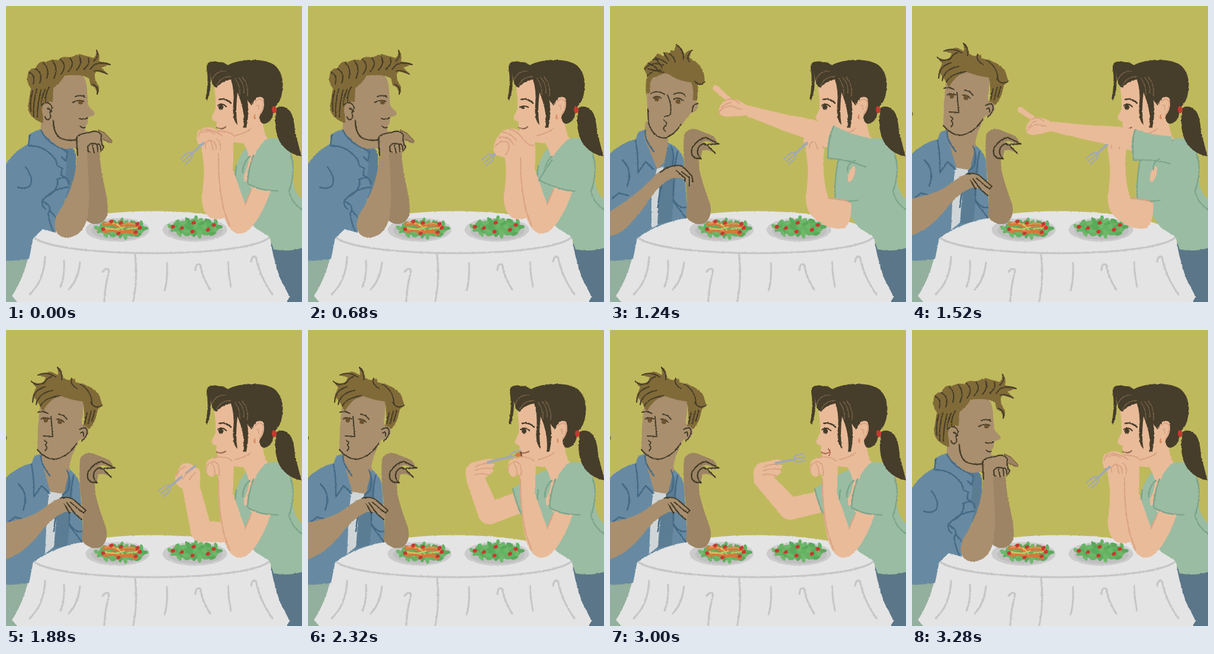
Write an HTML page that moves like this. It is 500 by 500 pixels and loops after 3.64 s.

```html
<!DOCTYPE html>
<html lang="en">
<head>
<meta charset="utf-8">
<title>Dinner for two</title>
<style>
html, body { margin: 0; width: 100%; height: 100%; overflow: hidden; background: #bfb95d; }
svg { display: block; width: 100vw; height: 100vh; }
.line { fill: none; stroke-linecap: round; stroke-linejoin: round; }
.pose { display: none; }
.pose.on { display: inline; }
</style>
</head>
<body>
<svg id="stage" viewBox="0 0 500 500"></svg>
<script>
const LOOP = 3640;
const C = {
  cloth: '#e4e4e4', fold: '#c6c6c6', plate: '#cccbcc',
  tan: '#a98f6e', tanShade: '#9c8464', ink: '#443c29', brown: '#806a38',
  denim: '#678aa2', denimDark: '#5b7d94', denimLine: '#456a86', tee: '#d0d6d8',
  peach: '#e9bb99', peachLine: '#d9a182', dark: '#463d2b',
  mint: '#9abca2', mintLine: '#7ba48a', steel: '#a2a8b2', red: '#c7392f'
};
const fill = (color, d) => `<path fill="${color}" d="${d}"/>`;
const line = (color, width, d) => `<path class="line" stroke="${color}" stroke-width="${width}" d="${d}"/>`;
const oval = (color, x, y, rx, ry, turn = 0) =>
  `<ellipse fill="${color}" rx="${rx}" ry="${ry}" transform="translate(${x} ${y}) rotate(${turn})"/>`;
const move = (transform, art) => `<g transform="${transform}">${art}</g>`;

// Tapered limb through joints given as [x, y, width]
function limb(color, ...joints) {
  let art = joints.map(([x, y, w]) => oval(color, x, y, w / 2, w / 2)).join('');
  for (let i = 1; i < joints.length; i++) {
    const [ax, ay, aw] = joints[i - 1], [bx, by, bw] = joints[i];
    const len = 2 * Math.hypot(bx - ax, by - ay);
    const nx = (ay - by) / len, ny = (bx - ax) / len;
    art += fill(color, `M${ax + nx * aw} ${ay + ny * aw}L${bx + nx * bw} ${by + ny * bw}` +
      `L${bx - nx * bw} ${by - ny * bw}L${ax - nx * aw} ${ay - ny * aw}Z`);
  }
  return art;
}

/* ---------- table ---------- */
function salad(cx, cy, rx, ry) {
  const greens = ['#66b263', '#5aa95a', '#6fb86a'];
  let art = oval(greens[0], cx, cy, rx - 2, ry - 2);
  for (let i = 0; i < 40; i++) {
    const a = i * 2.4, r = Math.sqrt((i + 1) / 40);
    art += oval(greens[i % 3], cx + rx * r * Math.cos(a), cy + ry * r * Math.sin(a), 6, 3.2, i * 53);
  }
  return art;
}
const tomatoes = spots => spots.map(([x, y]) => oval(C.red, x, y, 3.6, 3, -20)).join('');

const table =
  fill('#93af9d', 'M-9 428L42 424L20 505H-9Z') +
  fill('#5b7688', 'M442 400L510 405V510H460Z') +
  fill(C.cloth, 'M44 392C58 365 150 347 245 346.5C340 346 430 362 446 389Q449 420 463 460L479 491L469 510H22L19 500L10 490Q36 450 44 392Z') +
  line(C.fold, 3.4, 'M46 390C80 425 400 428 445 391') +
  line(C.fold, 3.2, 'M66 424Q64 465 40 487M98 430Q100 455 92 474M125 433Q122 462 106 479M163 449Q170 440 174 447Q167 475 166 499M218 419Q223 460 215 499M272 434Q273 465 268 480M320 446Q321 433 328 437Q332 460 345 479M375 432Q376 455 380 474M414 432Q416 420 422 424Q430 460 450 487') +
  oval(C.plate, 188.5, 378, 54, 20) + oval('#c0bfc0', 190, 379, 46, 16) +
  salad(195, 376.5, 42, 14) +
  line('#d27a3c', 7, 'M166 369Q178 366 192 372M197 371Q210 367 221 371M168 380Q181 376 193 382M197 381Q208 378 219 384') +
  line('#e5a35f', 1.6, 'M167 367Q180 364 190 371M198 369Q208 366 220 369M170 378Q182 375 192 380') +
  line('#cbd76c', 1.7, 'M165 375L187 377L200 373M188 368L198 379M205 377L225 374') +
  tomatoes([[178, 364], [194, 366], [164, 377], [190, 384], [222, 368], [226, 375], [219, 382]]) +
  oval(C.plate, 319, 378, 54.5, 20) + oval('#c0bfc0', 320, 380, 46, 15) +
  salad(320, 374, 43, 15) +
  tomatoes([[282, 373], [297, 375], [317, 366], [315, 381], [341, 378], [351, 370]]);

/* ---------- man ---------- */
const sideHead =
  fill(C.tan, 'M88 120L126 115Q137 122 137 145L139 168L150 181Q150 186 138 188L138 198Q133 203 134 212L122 228L118 240L92 242L58 212L62 165Z') +
  fill(C.brown, 'M63 198Q38 190 37 170L42 139Q32 128 38 111Q43 104 50 105Q54 92 68 94Q80 88 88 92Q94 83 108 87L124 81L148 88Q154 82 152 73Q160 80 157 93L176 99L161 104L173 116L152 110Q146 120 157 136Q158 147 153 150Q154 138 143 134L140 122Q128 114 99 118Q90 132 80 139L79 162Q64 160 62 172Z') +
  line(C.ink, 2, 'M45 143Q40 160 42 178M52 140Q45 165 47 187M59 142Q53 165 53 188M66 141Q59 157 60 168M73 137Q66 148 67 162M39 112Q50 116 46 132M50 106Q63 114 57 130M63 96Q74 106 69 122M78 93Q89 104 81 122M92 90Q104 101 93 115M108 88Q117 98 105 111M124 86Q130 96 119 108M139 88Q143 98 131 107M176 99Q154 90 142 107M153 75Q158 86 148 93M154 149Q158 138 146 132M171 115Q158 107 149 110') +
  oval(C.tan, 70, 178, 9, 15, -8) +
  line(C.ink, 2, 'M62 166Q72 159 78 171L76 179M70 173Q77 174 74 182Q78 188 72 192Q67 193 66 187') +
  line(C.ink, 2.4, 'M80 193Q80 216 92 223Q106 229 118 226') +
  line(C.ink, 2, 'M117 153Q128 149 133 154M113 163Q122 157 132 161M124 190Q132 193 138 189M125 203Q129 207 134 205') +
  oval('#6d522e', 126, 163, 4, 3.5);

const frontHead =
  fill(C.tan, 'M62 145L64 196Q68 218 90 223Q107 220 122 199L137 181Q150 178 149 163L141 158L146 125L75 108Z') +
  fill(C.brown, 'M61 149Q59 130 63 118L57 106Q61 96 72 91L80 80L91 85L91 78L102 80Q100 72 108 76L112 64Q124 72 126 83Q130 74 140 74Q133 83 136 89Q160 100 160 129L155 134L149 131L147 160L140 159Q142 140 137 129Q118 127 105 119Q97 113 90 114Q80 120 72 121Q66 129 68 146Z') +
  line(C.ink, 2, 'M58 107Q70 92 91 100M63 118Q75 106 87 108M72 91Q82 85 96 97M91 79L99 92M112 65Q125 74 124 91M100 80Q110 88 110 95M139 75Q127 84 134 94M66 97Q78 102 84 112M77 88L88 104M64 106Q80 110 91 112M160 128Q152 137 143 127') +
  line(C.ink, 2.2, 'M64 174L65 197Q72 222 92 223Q108 219 120 200') +
  line(C.ink, 2, 'M69 148Q79 141 92 149M108 149Q120 143 128 152M73 155Q80 150 87 156M108 157Q116 153 124 160M97 150Q105 166 102 184L92 187M91 193Q98 197 94 202Q87 207 94 212M148 165Q138 166 139 178') +
  oval('#6d522e', 79, 157, 4, 4) + oval('#6d522e', 115, 161, 4, 4);

const awayHead =
  fill(C.tan, 'M57 130L54 165L53 202Q60 217 85 219Q106 212 118 193L125 185Q140 182 139 167L128 158L133 112L75 106Z') +
  fill(C.brown, 'M62 138L54 122L45 111L51 97L42 86Q53 93 64 88L67 80L54 76L75 70L88 76L87 62Q97 69 96 80Q108 88 110 82L118 83L117 88Q148 94 158 111L163 128L155 134Q151 158 140 167L131 163Q134 137 130 121Q105 117 92 111Q75 115 62 138Z') +
  line(C.ink, 2, 'M43 87Q52 96 65 89Q70 80 77 79M54 76Q69 69 85 80M87 63Q96 72 94 84M45 122Q46 101 66 96M51 126Q55 106 79 102M58 128Q66 114 91 111M111 82Q107 91 120 99M126 92Q145 103 145 124M163 127Q150 135 143 122M137 140L133 158M144 137L139 158M150 136L145 154') +
  oval(C.tan, 131, 174, 8, 12, 20) +
  line(C.ink, 2, 'M124 168Q137 161 137 172Q136 181 128 187M126 174Q132 170 131 179') +
  line(C.ink, 2.2, 'M53 202Q68 220 85 218Q106 213 119 192') +
  line(C.ink, 2, 'M54 139Q62 136 71 141M89 142Q98 143 103 151M59 150Q66 147 74 150M85 151Q93 149 98 156M76 146L79 180L63 179M65 187Q72 190 66 194Q72 199 66 204') +
  oval('#6d522e', 67, 152, 4, 4) + oval('#6d522e', 91, 155, 4, 4);

const restingMan =
  fill(C.denimDark, 'M58 215L92 228Q110 228 118 250V320L90 330Z') +
  fill(C.denim, 'M-9 285Q4 250 39 232L40 216L57 208Q65 228 91 240L103 250L100 290L106 306L84 383L62 377L46 392L39 427Q20 431-9 430Z') +
  sideHead +
  line(C.denimLine, 2.5, 'M40 218L38 236Q66 235 84 260L87 270L95 274L93 285L101 291M59 210Q70 232 95 241L104 246L101 262L94 255M33 272Q47 290 41 303Q32 311 20 306M86 293Q106 285 106 300M87 293Q89 311 71 321M105 306Q76 309 61 330Q60 338 67 343M62 330Q80 338 71 350Q74 370 80 380M74 345L84 357') +
  fill(C.tanShade, 'M135 238L157 240C159 285 173 320 172 350C166 373 145 371 136 362Z') +
  fill(C.tanShade, 'M155 210L166 214L180 230Q171 233 162 224Z') +
  fill(C.tan, 'M118 235C124 280 107 320 88 350C77 370 82 389 100 391C121 392 133 378 138 355C143 318 138 282 137 248L153 248L165 240L162 218Q151 208 128 213Q118 215 118 235Z') +
  line(C.ink, 2.2, 'M121 252L119 224Q120 216 140 214Q154 207 161 218Q159 230 165 238L163 243M138 238Q142 229 154 234L155 246M146 235L149 248M138 238L139 246L142 247M155 233Q161 233 160 246') +
  line('#7f6846', 1.8, 'M156 210L166 214L179 228M161 224L178 231');

const raisedArm =
  fill(C.tanShade, 'M125 218Q131 204 149 209L175 220L184 234L163 228L155 230L138 239Q140 254 150 257L151 276Q156 300 169 334Q174 356 160 367Q142 373 128 356Q132 322 126 276Q123 245 125 218Z') +
  fill(C.tanShade, 'M139 244Q147 222 161 233L178 248L163 243L156 244L153 258L143 257Z') +
  line(C.ink, 2.3, 'M184 233L162 222Q149 224 139 239Q135 254 145 257L154 258Q145 250 149 240Q155 230 163 234L178 249M166 234Q174 233 183 233');

const shirtBack =
  fill(C.denim, 'M-9 258Q15 232 43 225L48 213L61 208L96 230Q118 238 124 258L126 278L131 358Q85 365 46 392L39 427Q20 431-9 430Z') +
  fill(C.denimDark, 'M97 236Q114 245 112 280L104 364L79 369L84 304Z');
// Neck and undershirt for each turn of the chest
const chests = {
  front: fill(C.tan, 'M60 195L104 205Q96 222 98 233L92 264L80 276L57 220Z') +
    fill(C.tee, 'M79 275L91 271L83 304L80 370L70 376L70 320Z'),
  side: fill(C.tan, 'M56 208L122 190Q106 220 107 238L97 280L75 274Z') +
    fill(C.tee, 'M73 273L98 277L86 302L81 366L66 378L69 310Z')
};
const shirtLines =
  line(C.denimLine, 2.5, 'M43 226Q48 250 47 282L60 263L74 276M60 210Q56 222 74 246M103 236Q110 250 105 270L97 277Q82 310 81 340M114 246Q106 288 107 330L128 358M21 260Q39 277 29 304M4 325L15 316L31 320M108 329Q118 343 128 340');

const forearm = {
  high: fill(C.tan, 'M-9 352Q44 322 80 282Q100 266 121 270L138 287L140 299L134 304L128 295L118 290L104 291Q85 300 70 322Q50 352 30 372Q15 389-9 389Z') +
    line(C.ink, 2.2, 'M97 273Q115 266 124 272L138 287L140 297M121 280L134 290L134 304M112 278L126 290L127 296M85 281L96 273'),
  low: fill(C.tan, 'M-9 326Q44 320 73 294Q93 279 109 283L134 303L132 310L128 320L118 309L102 307Q84 312 61 338Q30 381-9 390Z') +
    line(C.ink, 2.2, 'M92 284Q109 280 117 289L135 305L131 309M109 291L124 304L131 309M103 292L117 311L128 320M99 294L107 309')
};
const uprightMan = (head, chest, arm) => shirtBack + chests[chest] + shirtLines + raisedArm + head + forearm[arm];

const men = {
  rest: restingMan,
  stir: uprightMan(move('rotate(-4 90 220)', sideHead), 'front', 'high'),
  turn: uprightMan(frontHead, 'front', 'high'),
  away: uprightMan(awayHead, 'side', 'low') + line(C.ink, 1.5, 'M0 180v4')
};

/* ---------- woman ---------- */
const eyes = {
  open: oval(C.dark, 363, 171, 4, 4.6) + line(C.dark, 2.2, 'M358 168Q365 163 372 170'),
  shy: oval(C.dark, 363, 172, 3, 2) + line(C.dark, 2.2, 'M358 171Q365 167 372 171')
};
const mouths = {
  smirk: line('#8f6950', 2.2, 'M356 205Q365 210 371 204'),
  calm: line('#9b6956', 2.2, 'M356 206Q363 210 371 205'),
  chew: line('#a8614f', 2, 'M356 206Q361 211 368 207M368 201Q373 206 369 212'),
  chomp: line('#a8614f', 2, 'M356 204Q361 208 368 205M368 199Q375 206 370 214')
};
const womanHead = (eye, mouth) =>
  fill(C.dark, 'M457 172Q471 165 482 181Q487 192 488 211L499 254Q480 251 467 236Q454 220 455 190Z') +
  fill(C.peach, 'M350 118L354 158L354 174L347 189Q349 194 356 196L355 203L358 207L357 213Q362 224 376 229L400 232Q428 208 434 190L440 156L410 115Z') +
  fill(C.dark, 'M339 105Q338 92 354 94Q368 94 375 100C392 89 442 86 457 103Q470 118 467 142Q465 162 453 172Q452 196 436 199Q428 198 428 186Q440 172 434 155Q423 150 418 162L415 168Q404 158 404 143Q413 174 406 205L401 206Q405 179 391 146Q387 178 391 201L387 196Q382 185 384 165Q386 143 380 124Q363 127 356 138Q347 137 345 112Q348 138 340 160L337 157Q343 130 339 105Z') +
  line('#756044', 1.5, 'M348 126Q353 109 371 110M356 134Q363 119 380 119M387 122Q396 135 395 150M393 121Q403 131 402 147M399 120Q410 133 408 152') +
  line(C.peachLine, 1.8, 'M421 161Q431 153 435 163Q434 177 428 184M424 168Q429 166 427 175M387 219Q404 215 414 207') +
  line('#d98b5f', 2.5, 'M420 185V190') +
  oval(C.red, 453, 175, 4, 6) +
  line(C.dark, 2.6, 'M360 158Q371 155 380 164') +
  eyes[eye] + mouths[mouth];

const womanTorso =
  fill(C.mint, 'M436 225Q464 218 477 236Q485 254 484 282Q483 304 493 319L510 338V405Q482 417 452 411L445 390L420 374L386 326Q381 290 389 270Q396 246 412 234L430 240Z') +
  fill(C.peach, 'M396 205L433 192Q435 213 442 225Q419 251 408 294Q401 302 402 286Q412 263 410 254Q405 232 392 222Z') +
  line(C.mintLine, 2.3, 'M441 226Q418 252 408 297M412 254Q399 266 400 282M481 250Q490 279 478 313Q482 332 500 344M389 270Q385 300 390 314');

const chinHand =
  fill(C.peach, 'M337 232Q338 217 352 216Q373 209 385 224L384 250L360 256Q358 238 353 246Q340 253 337 232Z') +
  line(C.peachLine, 1.8, 'M338 238Q338 225 350 222Q362 224 360 246M348 225Q355 235 352 246M351 216Q370 211 382 221');
const bentArm = (slack = 0) =>
  fill(C.mint, `M440 225Q415 245 ${408 - slack} ${298 - slack / 3}Q430 313 459 312Q470 285 468 245Z`) +
  fill(C.peach, 'M409 302Q430 313 447 312Q436 346 418 370Q405 387 390 384Q372 378 366 345Q357 300 358 245L383 224Q385 260 383 275Q392 301 404 335L416 308Z') +
  (slack ? fill(C.mint, 'M410 262L390 294Q420 309 450 313L455 270Z') : '') +
  line(C.mintLine, 2.3, slack ? 'M412 260Q400 278 390 294Q420 310 450 313' : 'M418 252Q409 276 408 300Q430 313 459 312') +
  line(C.peachLine, 2, 'M359 250Q358 300 368 345L378 372M404 335L414 311');

function fork(x, y, turn, length, food = false) {
  const neck = length - 20;
  return move(`translate(${x} ${y}) rotate(${turn})`,
    line(C.steel, 4, `M0 0H${Math.max(neck, 2)}`) +
    line(C.steel, 2.3, `M${length} -6H${neck + 7}Q${neck + 1} -4 ${neck} 0Q${neck + 1} 4 ${neck + 7} 6H${length}M${neck} 0H${length}`) +
    (food ? oval('#d27a3c', length - 5, 0, 6, 3.5) + line('#6b4a30', 2, `M${length - 1} -4v8`) : ''));
}

const claspedHands =
  fill(C.peach, 'M322 226Q321 210 331 207Q346 202 357 210Q377 211 386 221L382 244L372 250L340 247Q325 238 322 226Z') +
  line(C.peachLine, 1.9, 'M325 220Q327 207 343 209Q358 213 365 219M332 214Q343 208 352 216M337 240Q335 228 345 227Q356 229 355 241M346 228L350 243M356 225Q364 229 362 243M357 211Q378 211 386 220');
const lowHands =
  fill(C.peach, 'M313 244Q314 224 329 211Q344 203 358 211L383 218L382 235Q372 241 366 255L340 258L318 252Z') +
  line(C.peachLine, 1.9, 'M316 238Q324 225 337 230Q343 239 334 251M328 213Q342 214 351 226M340 208Q354 211 361 222Q373 238 381 235M322 222Q340 219 347 234');
const uprightBackArm = fill(C.peach, 'M330 232L362 238Q361 310 374 356Q360 363 345 358Q329 346 331 318Q337 280 332 253Z');

const grip =
  fill(C.peach, 'M-25 14Q-29-13-10-18L14-18Q27-17 28-12L20-9L27-6L21 0L22 5L13 10Q2 11-6 26Z') +
  line(C.peachLine, 1.8, 'M-6-10Q8-13 20-9M-8-4Q6-6 21 0M-10 3Q3 2 13 10');
const backSleeve =
  fill(C.mint, 'M412 233Q372 248 346 268L360 311L392 292Z') +
  line(C.mintLine, 2.2, 'M346 268Q350 288 360 311');

// Back arm holding the fork: hand, turn, elbow, fork length, bite
function reach(hx, hy, turn, ex, ey, length, food) {
  const flip = Math.abs(turn) > 90 ? -1 : 1;
  const a = turn * Math.PI / 180, wx = -11, wy = 10 * flip;
  const wrist = [hx + wx * Math.cos(a) - wy * Math.sin(a), hy + wx * Math.sin(a) + wy * Math.cos(a), 31];
  return {
    back: limb(C.peach, wrist, [ex, ey, 37], [365, ey < 320 ? 288 : 334, 36]) + (ey < 320 ? backSleeve : '') +
      move(`translate(${hx} ${hy}) rotate(${turn}) scale(1 ${flip})`, grip),
    fork: fork(hx + 16 * Math.cos(a) + 12 * Math.sin(a) * flip, hy + 16 * Math.sin(a) - 12 * Math.cos(a) * flip, turn, length, food)
  };
}

const pointArm =
  fill(C.peach, 'M378 202Q340 190 300 184L230 167Q215 156 205 157L182 135Q173 131 174 141L196 160Q185 165 184 175Q183 186 198 187L229 185Q246 192 262 198Q300 214 338 226L372 242Z') +
  line(C.peachLine, 1.8, 'M184 179Q196 167 207 169Q214 174 222 174M196 159Q209 154 218 165M188 172Q196 164 204 163') +
  fill(C.mint, 'M442 224Q408 218 378 202Q363 226 368 258Q400 260 438 273Z') +
  line(C.mintLine, 2.3, 'M378 203Q368 224 368 257Q402 259 432 272M414 261Q400 266 401 279');
const pointBackArm =
  fill(C.peach, 'M330 232L362 238Q357 290 369 325L407 331Q410 360 397 375Q370 380 345 358Q329 346 331 318Q337 280 332 253Z') +
  line(C.peachLine, 1.8, 'M369 325Q389 325 406 332');
const pointHand =
  fill(C.peach, 'M326 228Q330 210 352 206L378 213L362 240L340 247Z') +
  line(C.peachLine, 1.8, 'M337 240Q336 230 346 228L351 242M354 225Q361 230 360 240');

function woman({ back = uprightBackArm, fork: tool = '', front = bentArm() + chinHand, eye = 'open', mouth = 'calm', dx = 0 }) {
  return back + womanTorso + move(`translate(${dx} 0)`, womanHead(eye, mouth)) + tool + front;
}
const pointing = (transform = '') => woman({
  back: '',
  front: fill(C.mint, 'M384 260L379 327Q396 333 420 329L430 260Z') + oval(C.peach, 408, 284, 5, 14, 18) +
    line(C.mintLine, 2.2, 'M385 262Q378 300 381 327Q396 332 420 328') +
    pointBackArm + pointHand + fork(333, 231, 138, 47) + move(transform, pointArm)
});
const aim = (turn, scale) => pointing(`translate(410 230) rotate(${turn}) scale(${scale}) translate(-410 -230)`);
const eating = (arm, mouth, dx = 1) => woman({ ...arm, mouth, dx });
const lowered = reach(267, 240, -12, 304, 302, 50);
const poised = {
  back: limb(C.peach, [312, 262, 29], [330, 340, 36], [372, 342, 34]) +
    fill(C.peach, 'M298 268Q284 262 286 248L294 230Q300 223 312 226L327 236Q330 250 326 268Z'),
  fork: fork(319, 230, 141, 74) +
    line(C.peach, 5, 'M303 230Q299 240 301 250') +
    line(C.peachLine, 1.8, 'M288 246Q293 233 303 231M299 252Q304 241 312 237M310 253Q315 244 320 241')
};

const women = {
  rest: woman({ front: bentArm() + claspedHands + fork(334, 231, 138, 47), mouth: 'smirk' }),
  shy: woman({ front: fork(317, 249, 142, 25) + bentArm(18) + lowHands, eye: 'shy', mouth: 'smirk' }),
  settle: woman({ front: fork(317, 249, 142, 25) + bentArm() + lowHands, mouth: 'smirk' }),
  lift: aim(-22, .6),
  thrust: aim(1, 1.05),
  point: pointing(),
  lower: aim(-8, .94),
  fold: aim(-20, .78),
  poise: woman(poised),
  lean: woman(reach(283, 294, 142, 326, 342, 66)),
  stab: woman(reach(254, 334, 150, 325, 344, 64)),
  scoop: woman(reach(266, 298, 160, 318, 338, 58, true)),
  raise: woman(reach(270, 238, -14, 304, 306, 58, true)),
  bite: eating(reach(291, 239, -14, 306, 310, 59, true), 'calm', 2),
  pull: eating(reach(276, 239, -13, 305, 306, 54), 'chomp', 2),
  chew: eating(lowered, 'chew'),
  chomp: eating(lowered, 'chomp', 2)
};

/* ---------- timeline ---------- */
const tracks = {
  man: [[0, 'rest'], [1160, 'stir'], [1240, 'turn'], [1320, 'away'], [3120, 'turn'], [3200, 'stir'], [3280, 'rest']],
  woman: [[0, 'rest'], [680, 'shy'], [760, 'settle'], [840, 'lift'], [920, 'thrust'], [960, 'point'],
    [1480, 'lower'], [1560, 'fold'], [1640, 'lift'], [1720, 'settle'], [1800, 'rest'], [1880, 'poise'], [1960, 'lean'],
    [2040, 'stab'], [2120, 'scoop'], [2200, 'raise'], [2320, 'bite'], [2440, 'pull'], [2520, 'chew'],
    [2600, 'chomp'], [2680, 'chew'], [2760, 'chomp'], [2840, 'chew'], [2920, 'chomp'], [3000, 'chew'],
    [3040, 'poise'], [3120, 'settle'], [3280, 'rest']]
};
const group = (who, poses) => Object.entries(poses)
  .map(([name, art]) => `<g class="pose" id="${who}-${name}">${art}</g>`).join('');

const stage = document.getElementById('stage');
stage.innerHTML = `<filter id="brush" filterUnits="userSpaceOnUse" x="-8" y="-8" width="516" height="516" color-interpolation-filters="sRGB">
  <feTurbulence type="fractalNoise" baseFrequency=".3" numOctaves="2" seed="4"/>
  <feDisplacementMap in="SourceGraphic" scale="2.6" xChannelSelector="R" yChannelSelector="G"/></filter>
  <g filter="url(#brush)">${table}${group('man', men)}${group('woman', women)}</g>`;

const shown = {};
function show(time) {
  for (const who in tracks) {
    const pose = tracks[who].findLast(([at]) => at <= time)[1];
    if (shown[who] === pose) continue;
    if (shown[who]) document.getElementById(`${who}-${shown[who]}`).classList.remove('on');
    document.getElementById(`${who}-${pose}`).classList.add('on');
    shown[who] = pose;
  }
}
const start = performance.now();
function tick(now) {
  show(Math.max(0, now - start) % LOOP);
  requestAnimationFrame(tick);
}
show(0);
requestAnimationFrame(tick);
</script>
</body>
</html>
```
